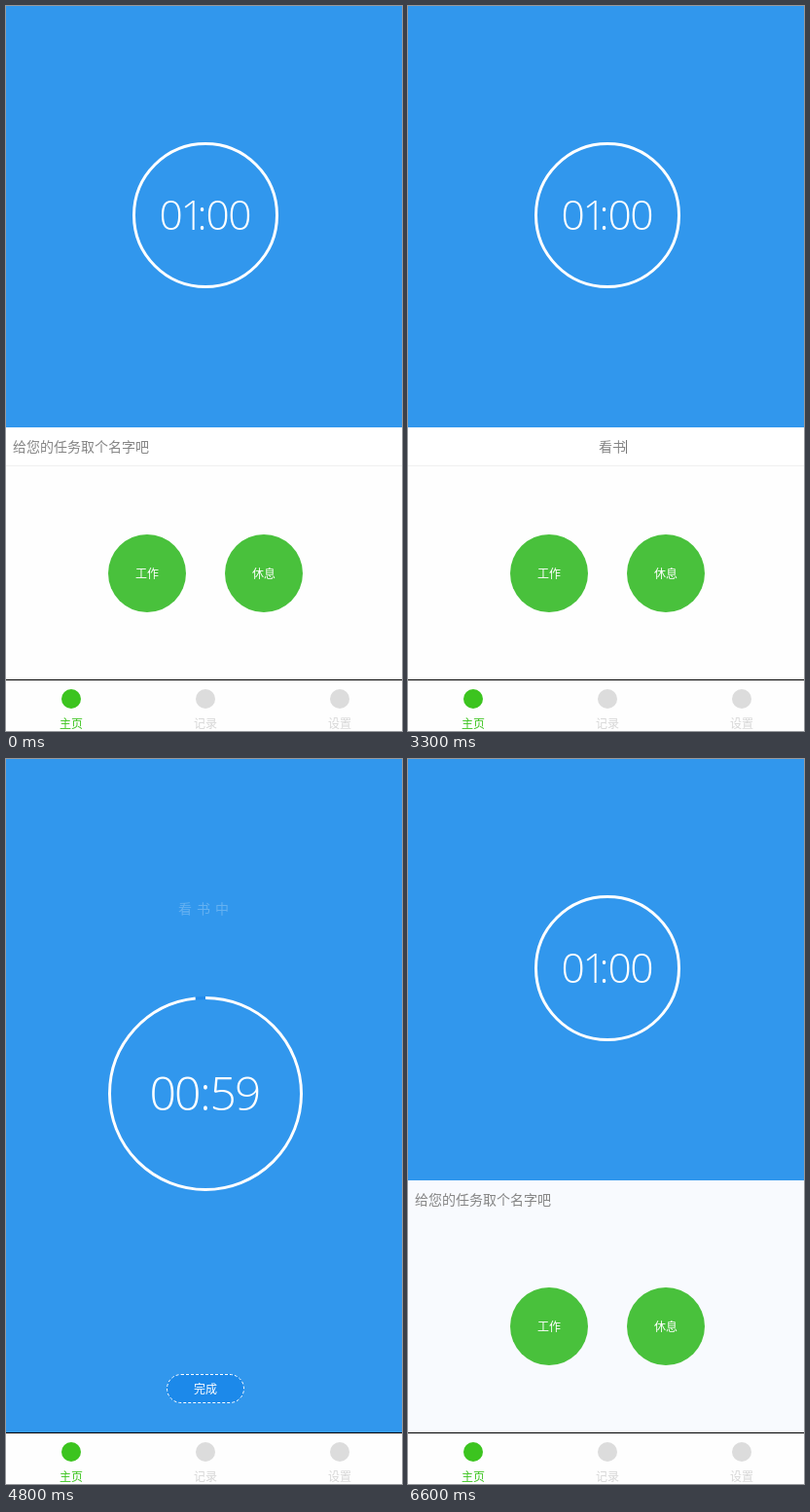
These frames come from a looping animation (407 px wide and 745 px high, 8 s). An HTML page with a canvas:

```html
<!DOCTYPE html>
<html lang="zh-CN">
<head>
<meta charset="utf-8">
<title>任务计时</title>
<style>
  html, body { margin: 0; width: 100%; height: 100%; overflow: hidden; background: #fefefe; }
  canvas { display: block; width: 407px; height: 745px; }
</style>
</head>
<body>
<canvas id="stage"></canvas>
<script>
const W = 407, H = 745, LOOP = 8000, STEP = 100;
const BLUE = '#3197ed', TRACK = '#2089ea', GREEN = '#49c13c', WHITE = '#fff';
const CJK = '"Noto Sans CJK SC", "Noto Sans CJK", "Noto Sans", sans-serif';
const THIN = '"Open Sans", "Noto Sans", sans-serif';
const WORK_START = 3600, WORK_END = 6600;
const TICKS = [4500, 5400, 6300];
const CX = 205;

const canvas = document.getElementById('stage');
const ctx = canvas.getContext('2d');
const dpr = window.devicePixelRatio || 1;
canvas.width = W * dpr;
canvas.height = H * dpr;
ctx.scale(dpr, dpr);

const clamp = v => Math.max(0, Math.min(1, v));
const easeOut = p => 1 - (1 - clamp(p)) ** 2;
const mix = (a, b, p) => a + (b - a) * p;
const mixColor = (a, b, p) => `rgb(${a.map((v, i) => Math.round(mix(v, b[i], p)))})`;

function rect(x, y, w, h, color) {
  ctx.fillStyle = color;
  ctx.fillRect(x, y, w, h);
}

function disc(x, y, r, color) {
  ctx.fillStyle = color;
  ctx.beginPath();
  ctx.arc(x, y, r, 0, Math.PI * 2);
  ctx.fill();
}

function ring(y, r, color, fraction = 1) {
  ctx.strokeStyle = color;
  ctx.lineWidth = 3;
  ctx.beginPath();
  ctx.arc(CX, y, r - 1.5, -Math.PI / 2, -Math.PI / 2 + Math.PI * 2 * fraction);
  ctx.stroke();
}

// Text placed by the vertical centre of its em box.
function label(text, x, y, size, color, align = 'center', weight = 400) {
  ctx.font = `${weight} ${size}px ${CJK}`;
  ctx.textAlign = align;
  ctx.fillStyle = color;
  ctx.fillText(text, x, y + size * 0.38);
}

// Tight clock digits with a narrow "1".
function clock(text, y, size) {
  const advance = c => size * (c === ':' ? 0.23 : c === '1' ? 0.37 : 0.53);
  let x = CX - [...text].reduce((sum, c) => sum + advance(c), 0) / 2;
  ctx.font = `300 ${size}px ${THIN}`;
  ctx.textAlign = 'center';
  ctx.fillStyle = WHITE;
  for (const c of text) {
    const nudge = c === '1' ? size * 0.065 : 0;
    ctx.fillText(c, x + advance(c) / 2 + nudge, y + size * 0.345);
    x += advance(c);
  }
}

function drawNav() {
  rect(0, 692, W, 53, '#fefefe');
  rect(0, 692, W, 1, '#000');
  ['主页', '记录', '设置'].forEach((name, i) => {
    const x = 67 + i * 138;
    disc(x, 712, 10, i ? '#dcdcdc' : '#3cc41f');
    label(name, x, 737.5, 12, i ? '#d6d6d6' : '#3cc41f');
  });
}

function drawComposer(t) {
  const typed = t < 1800 ? 'k' : t < 1900 ? 'kan' : t < 2000 ? "kan's" : "kan'shu";
  label(typed, 210, 453, 14, '#888');
  const half = ctx.measureText(typed).width / 2;
  rect(210 - half, 460, half * 2, 1, '#999');
  rect(216, 464, W - 216, 44, '#d5dce4');
  rect(217, 465, W - 217, 42, WHITE);
  label(typed, 225, 475, 12, '#444', 'left');
  rect(217, 485, W - 217, 1, '#eceff2');
  const picks = t < 1800 ? '1.看 2.可 3.快 4.开' : t < 1900 ? '1.看 2.砍 3.刊 4.堪' : '1.看书 2.看 3.砍 4.刊';
  label(picks, 225, 496, 13, '#333', 'left');
}

function drawField(t) {
  if (t < 500 || t >= WORK_END) {
    label('给您的任务取个名字吧', 7, 453, 14, '#858585', 'left');
  } else if (t < 1600) {
    if (t < 900 || t >= 1400) rect(210, 446, 1, 14, '#777');
  } else if (t < 2300) {
    drawComposer(t);
  } else {
    label('看书', 210, 453, 14, '#858585');
    if (t < 2800 || t >= 3300) rect(224, 446, 1, 14, '#777');
  }
}

function drawHome(t) {
  const returned = t >= WORK_END;
  rect(0, 0, W, 433, BLUE);
  rect(0, 433, W, 259, returned ? '#f8fafe' : '#fefefe');
  if (!returned) {
    rect(0, 433, W, 39, WHITE);
    rect(0, 472, W, 1, '#f0f0f0');
  }
  ring(215, 75, WHITE);
  clock('01:00', 215, 42.5);
  disc(145, 583, 40, GREEN);
  disc(265, 583, 40, GREEN);
  label('工作', 145, 583, 12, WHITE);
  label('休息', 265, 583, 12, WHITE);
  drawField(t);
}

function drawDoneButton(p) {
  const top = mix(613, 632, p), bottom = mix(691, 662, p);
  const h = bottom - top;
  ctx.fillStyle = mixColor([72, 189, 68], [28, 137, 234], p);
  ctx.beginPath();
  ctx.roundRect(165, top, 80, h, h / 2);
  ctx.fill();
  ctx.strokeStyle = WHITE;
  ctx.lineWidth = 1;
  ctx.setLineDash([3, 2]);
  ctx.beginPath();
  ctx.roundRect(165.5, top + 0.5, 79, h - 1, (h - 1) / 2);
  ctx.stroke();
  ctx.setLineDash([]);
  label('完成', CX, (top + bottom) / 2 + 0.5, 12, WHITE, 'center', 500);
}

function drawWork(t) {
  const p = easeOut((t - WORK_START) / 500);
  const r = mix(80, 100, p);
  const elapsed = TICKS.filter(start => t >= start).length;
  const swept = TICKS.reduce((sum, start) => sum + easeOut((t - start + STEP) / 400) * (t >= start), 0);

  rect(0, 0, W, 692, BLUE);
  [...'看书中'].forEach((c, i) => label(c, 184 + i * 19, 344 - r - 90, 14, 'rgba(255,255,255,.25)'));
  ring(344, r, TRACK);
  ring(344, r, WHITE, 1 - swept / 60);
  clock(elapsed ? `00:${60 - elapsed}` : '01:00', 344, mix(43.5, 48, p));
  drawDoneButton(p);
}

function frame(now) {
  const t = Math.floor((now % LOOP) / STEP) * STEP;
  if (t >= WORK_START && t < WORK_END) drawWork(t);
  else drawHome(t);
  drawNav();
}

let begin = null;
function loop(now) {
  if (begin === null) begin = now;
  frame(now - begin);
  requestAnimationFrame(loop);
}
frame(0);
requestAnimationFrame(loop);
</script>
</body>
</html>
```
